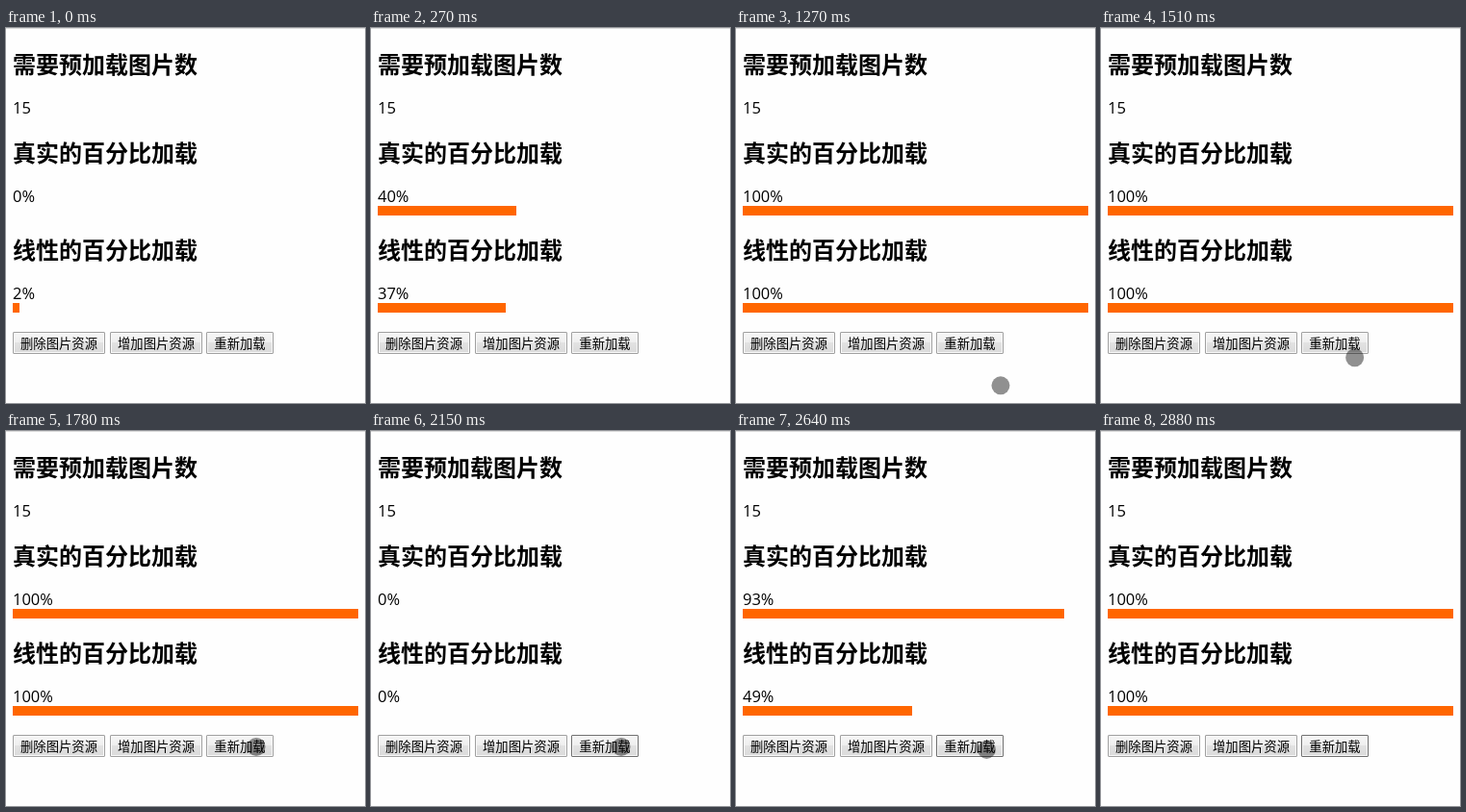
An HTML page that plays this animation: 373 px wide and 390 px high, repeating every 4120 ms.

```html
<!DOCTYPE html>
<html lang="zh-CN">
<head>
<meta charset="utf-8">
<style>
html, body { margin: 0; width: 100%; height: 100%; overflow: hidden; background: #fefefe; }
body { position: relative; color: #000; font: 16.5px/20px "Open Sans", "Noto Sans CJK SC", sans-serif; }
body > * { position: absolute; left: 7px; margin: 0; white-space: nowrap; box-sizing: border-box; }
#edge { left: 0; top: 0; width: 100%; height: 1px; background: #ddd; }
h2 { font: bold 24px/30px "Noto Sans CJK SC", sans-serif; }
.bar { height: 10px; background: #f60; }
.button {
  top: 316px; width: 96px; height: 23px; text-align: center;
  font: 300 13.333px/21px "Noto Sans CJK SC", sans-serif;
  border: 1px solid #a0a0a0; border-radius: 1px;
  background: linear-gradient(#f6f6f6, #efefef 45%, #e2e2e2 50%, #dadada);
  box-shadow: inset 0 0 0 1px #f8f8f8;
}
.button.focus { border-color: #707070; }
#pointer { left: -9.5px; top: -9.5px; width: 19px; height: 19px; border-radius: 50%; background: rgba(0, 0, 0, .43); }
</style>
</head>
<body>
<div id="edge"></div>
<h2 style="top:22px">需要预加载图片数</h2>
<p style="top:73px">15</p>
<h2 style="top:114px">真实的百分比加载</h2>
<p id="realText" style="top:165px"></p>
<div id="realBar" class="bar" style="top:185px"></div>
<h2 style="top:215px">线性的百分比加载</h2>
<p id="linearText" style="top:266px"></p>
<div id="linearBar" class="bar" style="top:286px"></div>
<div class="button">删除图片资源</div>
<div class="button" style="left:108px">增加图片资源</div>
<div class="button" id="reload" style="left:208px;width:70px">重新加载</div>
<div id="pointer"></div>
<script>
const LOOP = 4120, TICK = 30, TOTAL = 15, FULL_WIDTH = 359, CLICK = 2150;
const $ = id => document.getElementById(id);

// Pointer path: time, x, y
const path = [
  [1270, 274.5, 371.5], [1420, 268, 352], [1570, 260, 336], [1690, 257.5, 330],
  [1780, 259.5, 328], [2630, 259.5, 328], [2670, 261, 338.5],
  [2760, 267, 362], [2880, 277, 399]
];

const runs = [
  { start: 0, realEnd: 500, linearEnd: 500, from: 2, power: 1.67 },
  { start: 2140, realEnd: 2670, linearEnd: 2840, from: 0, power: 1.87 }
];

function realPercent(run, t, elapsed) {
  if (t >= run.realEnd) return 100;
  const loaded = elapsed < 270 ? elapsed / 45 : 6 + (elapsed - 270) / 24;
  return Math.floor(Math.min(TOTAL, Math.floor(loaded)) / TOTAL * 100);
}

function linearPercent(run, t, elapsed) {
  if (t >= run.linearEnd) return 100;
  const progress = elapsed / (run.linearEnd - run.start);
  return Math.round(run.from + (100 - run.from) * progress ** run.power);
}

function showPercent(name, percent) {
  $(name + "Text").textContent = percent + "%";
  $(name + "Bar").style.width = percent / 100 * FULL_WIDTH + "px";
}

function showPointer(t) {
  const i = path.findIndex(([time]) => t < time);
  $("pointer").hidden = i < 1;
  if (i < 1) return;
  const [t0, x0, y0] = path[i - 1], [t1, x1, y1] = path[i];
  const k = (t - t0) / (t1 - t0);
  $("pointer").style.transform = `translate(${x0 + (x1 - x0) * k}px, ${y0 + (y1 - y0) * k}px)`;
}

function draw(now) {
  const t = now % LOOP;
  const run = runs[t < CLICK ? 0 : 1];
  const elapsed = Math.floor((t - run.start) / TICK) * TICK;
  showPercent("real", realPercent(run, t, elapsed));
  showPercent("linear", linearPercent(run, t, elapsed));
  $("reload").classList.toggle("focus", t >= CLICK);
  showPointer(t);
}

const begin = performance.now();
function frame() {
  draw(performance.now() - begin);
  requestAnimationFrame(frame);
}
frame();
</script>
</body>
</html>
```
